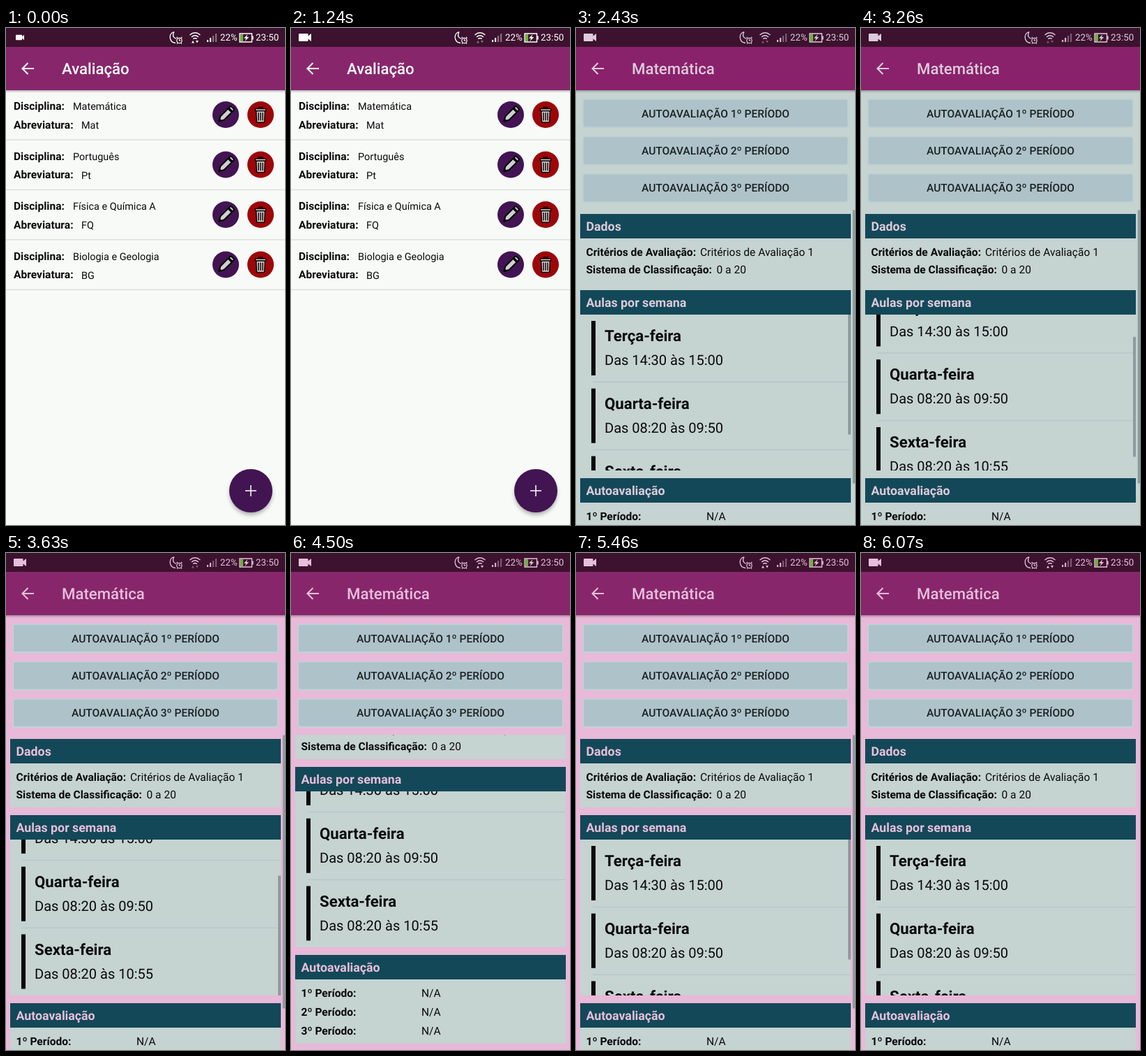
Recreate the animation shown at these times as an HTML page. Size 400x711 px, loop 6.27 s.

```html
<!DOCTYPE html>
<html lang="pt">
<head>
<meta charset="utf-8">
<title>Avaliação</title>
<style>
  html, body { margin: 0; width: 100%; height: 100%; overflow: hidden; background: #000; }
  #stage { display: block; width: 100%; height: 100%; font-family: Roboto, sans-serif; --ink: #fff; }
  #stage.soft { --paper: #f8faf7; --bar: #88266c; --card: #cacbca; --head: #554b55; --button: #b6b7b5; --rim: #a2a3a1; --line: #b2b3b2; --thumb: #929392; }
  #stage.pale { --ink: #dccbda; --paper: #c5d3d1; --bar: #8a216b; --card: #c5d3d1; --head: #134858; --button: #aec3c9; --rim: #bccfd1; --line: #b3c2c3; --thumb: #8c9b9c; }
  #stage.pink { --ink: #e6bfda; --paper: #e8b9d8; --bar: #88266b; --card: #c5d3d1; --head: #134858; --button: #aec3c9; --rim: #bfd6d8; --line: #b3c2c3; --thumb: #929a9f; }
  text { white-space: pre; fill: #0a0a0a; text-rendering: geometricPrecision; }
  .status { font-size: 13.33px; fill: var(--ink); }
  .title { font-size: 22.2px; font-weight: 500; fill: var(--ink); }
  .label { font-size: 15.56px; font-weight: 700; }
  .value { font-size: 15.56px; }
  .small { font-size: 14.44px; }
  .caps { font-size: 15.56px; font-weight: 500; text-anchor: middle; fill: #1c2224; }
  .section { font-size: 17.78px; font-weight: 700; fill: var(--ink); }
  .day { font-size: 22.2px; font-weight: 700; }
  .hours { font-size: 20px; }
  .stroke { fill: none; stroke: var(--ink); }
  .ink { fill: var(--ink); }
  .thumb { fill: var(--thumb); }
</style>
</head>
<body>
<svg id="stage" class="soft" viewBox="0 0 400 711" preserveAspectRatio="none">
  <defs>
    <filter id="blur" x="-30%" y="-30%" width="160%" height="160%"><feGaussianBlur stdDeviation="3"/></filter>
    <linearGradient id="shade" x2="0" y2="1">
      <stop stop-color="#000" stop-opacity=".25"/><stop offset="1" stop-color="#000" stop-opacity="0"/>
    </linearGradient>
    <g id="pencil">
      <circle r="19" fill="#421452"/>
      <g transform="rotate(45)" fill="#cfcfcf" stroke="#050505" stroke-width="2" stroke-linejoin="round">
        <path d="M-3.7-8.5H3.7V7L0 13.5L-3.7 7Z"/>
        <path d="M-3.7-10V-12Q-3.7-14-2-14H2Q3.7-14 3.7-12V-10Z"/>
        <path d="M-1.4 11L0 13.5L1.4 11Z" fill="#050505"/>
      </g>
    </g>
    <g id="trash">
      <circle r="19" fill="#9c0709"/>
      <g fill="#cfcfcf" stroke="#100" stroke-width="1.5" stroke-linejoin="round">
        <path d="M-2.6-8V-10.5H2.6V-8" fill="none"/>
        <path d="M-6.3-5.5H6.3L5.5 11H-5.5Z"/>
        <rect x="-7.7" y="-8.6" width="15.4" height="3.2" rx="1"/>
        <path d="M-3-3V8.5M0-3V8.5M3-3V8.5"/>
      </g>
    </g>
  </defs>
  <g id="home"></g>
  <g id="page"></g>
  <g id="status"></g>
</svg>
<script>
const LOOP = 6270, TICK = 95.7;
const $ = id => document.getElementById(id);

const text = (cls, x, y, str) => `<text class="${cls}" x="${x}" y="${y}">${str}</text>`;
const rect = (x, y, w, h, fill, extra = '') =>
  `<rect x="${x}" y="${y}" width="${w}" height="${h}" fill="${fill}" ${extra}/>`;
const clip = (x, y, w, h, body) =>
  `<svg x="${x}" y="${y}" width="${w}" height="${h}" viewBox="${x} ${y} ${w} ${h}">${body}</svg>`;
const repeat = (items, draw) => items.map(draw).join('');

const appBar = (title, fill) =>
  rect(0, 89, 400, 4, 'url(#shade)') + rect(0, 27, 400, 62, fill) +
  '<path class="stroke" stroke-width="2.1" d="M40 58H24M31.5 50L23.5 58L31.5 66"/>' +
  text('title', 80, 66, title);

const subjects = [['Matemática', 'Mat'], ['Português', 'Pt'],
  ['Física e Química A', 'FQ'], ['Biologia e Geologia', 'BG']];

$('home').innerHTML =
  rect(0, 27, 400, 684, '#f8faf8') +
  rect(0, 89, 400, 71, '#000', 'id="ripple" opacity="0"') +
  repeat(subjects, ([name, short], i) => `<g transform="translate(0 ${i * 71.5})">` +
    text('label', 11, 117, 'Disciplina:') + text('small', 96, 117, name) +
    text('label', 11, 143.5, 'Abreviatura:') + text('small', 108, 144, short) +
    '<use href="#pencil" x="315" y="124"/><use href="#trash" x="365" y="124"/>' +
    rect(0, 159.3, 400, 1.3, '#d9dbd9') + '</g>') +
  appBar('Avaliação', '#88266c') +
  '<circle cx="351" cy="666" r="30" opacity=".35" filter="url(#blur)"/>' +
  '<circle cx="351" cy="662" r="31" fill="#421452"/>' +
  '<path d="M343 662H359M351 654V670" stroke="#fff" stroke-width="1.5"/>';

const card = (y, title, bodyHeight) =>
  rect(6, y, 388, 35 + bodyHeight, 'var(--card)') + rect(6, y, 388, 35, 'var(--head)') +
  text('section', 14.5, y + 24.3, title);

const lessons = [['Terça-feira', '14:30 às 15:00'], ['Quarta-feira', '08:20 às 09:50'],
  ['Sexta-feira', '08:20 às 10:55']];

const lessonList = '<g id="lessons">' + repeat(lessons, ([day, hours], i) =>
  `<g transform="translate(0 ${i * 96.75})">` +
  rect(22, 419, 6, 78, '#050505') + text('day', 41, 448, day) + text('hours', 41, 482, 'Das ' + hours) +
  (i < 2 ? rect(24, 506, 369, 1, 'var(--line)') : '') + '</g>') + '</g>';

const details =
  card(266, 'Dados', 63) +
  text('label', 14.5, 326, 'Critérios de Avaliação:') + text('value', 178, 326, 'Critérios de Avaliação 1') +
  text('label', 14.5, 350.5, 'Sistema de Classificação:') + text('value', 201.5, 350.5, '0 a 20') +
  card(375, 'Aulas por semana', 223) +
  clip(6, 410, 388, 223, lessonList + '<rect id="listThumb" class="thumb" x="390" width="4" height="171.5"/>') +
  card(644, 'Autoavaliação', 92) +
  repeat([1, 2, 3], n => text('label', 14.5, 677.5 + n * 26.8, n + 'º Período:') +
    text('value', 187, 677.5 + n * 26.8, 'N/A'));

$('page').innerHTML =
  rect(0, 27, 400, 684, 'var(--paper)') +
  repeat([1, 2, 3], n => {
    const y = 49.4 + n * 53.4;
    return rect(9.5, y - 1.3, 381, 41.5, 'var(--rim)', 'rx="3"') +
      rect(11, y, 378, 38.5, 'var(--button)', 'rx="2"') +
      text('caps', 200, y + 24.7, `AUTOAVALIAÇÃO ${n}º PERÍODO`);
  }) +
  clip(0, 260, 400, 451, `<g id="details">${details}</g>` +
    '<rect id="pageThumb" class="thumb" x="396.7" width="3.3" height="391"/>') +
  appBar('Matemática', 'var(--bar)');

$('status').innerHTML =
  rect(0, 0, 400, 27, '#3c122e') +
  '<path id="camera" class="ink" d="M-8-5.5H3.5Q4.5-5.5 4.5-4.5V-2L9-5.5V5.5L4.5 2V4.5Q4.5 5.5 3.5 5.5H-8Q-9 5.5-9 4.5V-4.5Q-9-5.5-8-5.5Z"/>' +
  '<path class="stroke" stroke-width="1.3" d="M241 5.5C233 8 233 20 243 21.5M241 5.5C238 11 240 14 244 15.5"/>' +
  '<g class="stroke" stroke-width="1.2"><circle cx="248.5" cy="18" r="3.7"/><path d="M248.5 15.7V18H250.5M244.5 14.5L246 13M252.5 14.5L251 13M246 21.5L245 22.7M251 21.5L252 22.7"/></g>' +
  '<path class="stroke" stroke-width="1.4" d="M263.5 10Q271 3.5 278.5 10M266 13Q271 8.5 276 13M268.3 15.6Q271 13.4 273.7 15.6"/>' +
  '<path id="traffic" class="ink" d="M266 21.5L268 18L270 21.5ZM272 18H276L274 21.5Z"/>' +
  repeat([0, 1, 2, 3], i => rect(288 + i * 4, 17 - i * 3, 2.2, 3 + i * 3, 'var(--ink)', `opacity="${i < 2 ? 0.9 : 0.4}"`)) +
  text('status', 307, 18.4, '22%') +
  rect(336, 9, 4, 10, '#6cb33a') +
  '<path class="stroke" stroke-width="1.4" d="M335 8H352.5V20H335ZM354 11.5V16.5"/>' +
  '<path class="ink" d="M346.5 9L341 14.7H344.2L342.5 19L348.3 13H345Z"/>' +
  text('status', 358, 18.4, '23:50');

// Each track is a list of [tick, value], joined by straight lines.
const tracks = {
  camera: [[0, .67], [4, 1]],
  ripple: [[17, 0], [18, .05], [19, .1], [22, 0]],
  dim: [[19, 1], [22, .88]],
  rise: [[20, 57], [21, 32], [22, 11], [23, 2], [24, 0]],
  fade: [[20, 0], [21, .6], [22, .93], [23, 1]],
  list: [[33, 0], [34, 41.5], [35, 58], [37, 67], [49, 67], [52, 4], [53, 0]],
  scroll: [[40, 0], [42, 35], [43, 55], [45, 69], [52, 69], [54, 47], [56, 8], [57, 0]],
  thumbs: [[44, 1], [47, 0], [48, 0], [49, 1], [59, 1], [62, 0]]
};

function at(track, tick) {
  const next = track.findIndex(key => key[0] > tick);
  if (next === 0) return track[0][1];
  if (next < 0) return track[track.length - 1][1];
  const [t0, v0] = track[next - 1], [t1, v1] = track[next];
  return v0 + (v1 - v0) * (tick - t0) / (t1 - t0);
}

const set = (id, name, value) => $(id).setAttribute(name, value);
const shift = (id, y) => set(id, 'transform', `translate(0 ${y})`);

function draw(now) {
  const tick = Math.floor((now % LOOP + 20) / TICK);
  const v = {};
  for (const name in tracks) v[name] = at(tracks[name], tick);

  set('stage', 'class', tick < 25 ? 'soft' : tick < 35 ? 'pale' : 'pink');
  set('camera', 'transform', `translate(20 13.5) scale(${v.camera})`);
  set('traffic', 'opacity', tick >= 13 && tick < 41 ? .4 : 1);
  set('ripple', 'opacity', v.ripple);
  set('home', 'opacity', v.dim);
  set('page', 'opacity', v.fade);
  shift('page', v.rise);
  shift('lessons', -v.list);
  shift('details', -v.scroll);
  set('listThumb', 'y', 410 + v.list * 223 / 290);
  set('pageThumb', 'y', 260.5 + v.scroll * 451 / 520);
  set('listThumb', 'opacity', v.thumbs);
  set('pageThumb', 'opacity', v.thumbs);
}

const start = performance.now();
function loop() {
  draw(performance.now() - start);
  requestAnimationFrame(loop);
}
loop();
</script>
</body>
</html>
```
